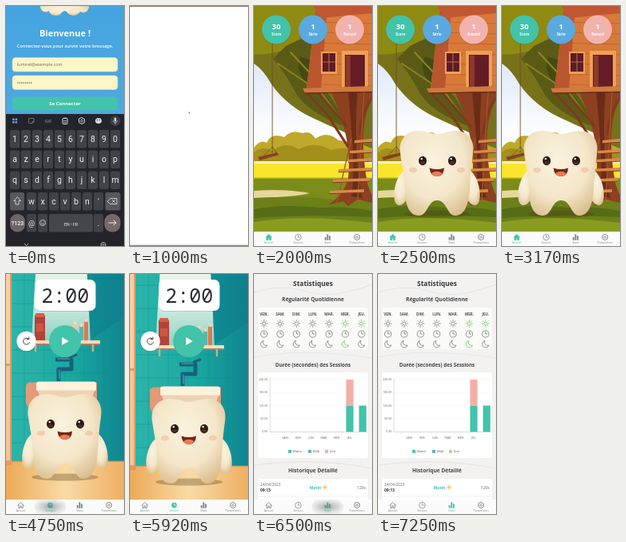
These frames come from a looping animation (148 px wide and 300 px high, 8 s). An HTML page:

```html
<!DOCTYPE html>
<html lang="fr">
<head>
<meta charset="utf-8">
<title>Brossage</title>
<style>
html, body { margin: 0; width: 100%; height: 100%; overflow: hidden; background: #fff; }
svg { display: block; width: 100vw; height: 100vh; }
text { font-family: "Open Sans", "Noto Sans", sans-serif; }
.key { font-family: Roboto, sans-serif; }
.mono { font-family: "Noto Sans Mono", "DejaVu Sans Mono", monospace; }
</style>
</head>
<body>
<svg id="stage" viewBox="0 0 148 300" preserveAspectRatio="none"></svg>
<script>
const LOOP = 8000, TEAL = '#43c3a9', BLUE = '#5aa9df', PINK = '#f2b3ae';
const DAYS = ['VEN.', 'SAM.', 'DIM.', 'LUN.', 'MAR.', 'MER.', 'JEU.'];

const rect = (x, y, w, h, fill, r = 0, more = '') =>
  `<rect x="${x}" y="${y}" width="${w}" height="${h}" rx="${r}" fill="${fill}" ${more}/>`;
const circle = (x, y, r, fill, more = '') =>
  `<circle cx="${x}" cy="${y}" r="${r}" fill="${fill}" ${more}/>`;
const oval = (x, y, rx, ry, fill, more = '') =>
  `<ellipse cx="${x}" cy="${y}" rx="${rx}" ry="${ry}" fill="${fill}" ${more}/>`;
const path = (d, fill, more = '') => `<path d="${d}" fill="${fill}" ${more}/>`;
const line = (d, stroke, width = 1) =>
  path(d, 'none', `stroke="${stroke}" stroke-width="${width}" stroke-linecap="round" stroke-linejoin="round"`);
const text = (x, y, s, size, fill, weight = 400, anchor = 'middle', cls = '') =>
  `<text x="${x}" y="${y}" font-size="${size}" fill="${fill}" font-weight="${weight}" text-anchor="${anchor}" class="${cls}">${s}</text>`;
const group = (id, s) => `<g id="${id}">${s}</g>`;
const at = (x, y, s, k = 1) => `<g transform="translate(${x} ${y}) scale(${k})">${s}</g>`;
const repeat = (n, f) => Array.from({ length: n }, (_, i) => f(i)).join('');

// Icons centred on 0,0
const sun = c => circle(0, 0, 2.1, 'none', `stroke="${c}" stroke-width=".75"`) +
  repeat(8, i => {
    const a = i * Math.PI / 4, x = Math.cos(a), y = Math.sin(a);
    return line(`M${x * 3.3} ${y * 3.3}L${x * 4.6} ${y * 4.6}`, c, .75);
  });
const clock = c => circle(0, 0, 4.1, 'none', `stroke="${c}" stroke-width=".8"`) + line('M0 -2.5V0H2', c, .8);
const moon = c => line('M-1.2 -4A4.3 4.3 0 1 0 4.1 1.6A4.2 4.2 0 0 1 -1.2 -4Z', c, .8);
const gear = c => line('M0 -4L3.5 -2V2L0 4L-3.5 2V-2Z', c, 1) + circle(0, 0, 1.5, 'none', `stroke="${c}" stroke-width=".8"`);
const house = c => line('M-4 0L0 -3.8L4 0M-2.9 -.8V3.8H-.8V1H.8V3.8H2.9V-.8', c, .9);
const bars = c => rect(-3.8, 0, 2, 4, c) + rect(-1, -4, 2, 8, c) + rect(1.8, -1.8, 2, 5.8, c);

const tabX = i => 18.5 + 36.9 * i;

function nav(active) {
  const items = [['Accueil', house], ['Session', clock], ['Stats', bars], ['Paramètres', gear]];
  return rect(0, 282, 148, 18, '#fbfbfb') + items.map(([name, icon], i) => {
    const c = i === active ? TEAL : '#808386';
    const fill = i === active && i < 2 ? (i ? circle(0, 0, 4, c) : path('M-4 0L0 -4L4 0H3V4H1V1H-1V4H-3V0Z', c)) : '';
    return at(tabX(i), 289, fill + icon(fill && i ? '#e9fff8' : c), .93) + text(tabX(i), 297.4, name, 3.6, c);
  }).join('');
}

function tooth() {
  const skin = 'url(#enamel)';
  const eye = x => oval(x, 193.5, 5, 5.8, '#2a1914') + oval(x, 196, 3, 2.2, '#4d2b20') + circle(x - 1.3, 191, 1.2, '#fff');
  return oval(74, 260, 42, 4.5, '#4f3c12', 'opacity=".32"') +
    path('M34 205C24 210 18 230 21 244C24 253 34 249 37 239Z', skin) +
    path('M114 205C124 210 130 230 127 244C124 253 114 249 111 239Z', skin) +
    path('M28 185C25 168 35 156 50 156C62 156 66 160 74 160C82 160 87 156 98 156C113 156 122 168 119 185C117 199 116 211 115 229C114 247 109 262 97 262C86 262 87 243 74 243C62 243 63 262 51 262C38 262 34 246 34 230C33 211 30 199 28 185Z', skin) +
    oval(44, 205, 5, 3.2, '#eda07c', 'opacity=".38"') + oval(104, 205, 5, 3.2, '#eda07c', 'opacity=".38"') +
    eye(56) + eye(93) +
    path('M64.5 202.5Q74 205.5 83 202.5Q82.5 213 74 213Q65.5 213 64.5 202.5Z', '#74261c') +
    path('M67 209Q74 204.5 80.5 209Q78 213 74 213Q69.5 213 67 209Z', '#ee7a52');
}

function keyboard() {
  const c = '#d8d9dc', dark = '#414247';
  const key = (x, y, w, s, fill = dark, size = 10.5) =>
    rect(x - w / 2, y - 11, w, 22.5, fill, 2.5) + text(x, y + 3.5, s, size, '#f0f0f2', 400, 'middle', 'key');
  const row = (s, x, y) => [...s].map((k, i) => key(x + 14 * i, y, 12.2, k)).join('');
  const grid = repeat(4, i => rect(-3 + 3.5 * (i % 2), -3 + 3.5 * (i >> 1), 2.6, 2.6, '#6f9ae3', .5));
  return rect(0, 135, 148, 165, '#232429') +
    at(11, 143.5, grid) +
    at(32, 143.5, line('M-3 -3H3V1L1 3H-3ZM1 3V1H3', '#77797e', .9)) +
    text(53, 146, 'GIF', 5.5, '#777a80', 600, 'middle', 'key') +
    at(74, 143.5, rect(-3, -3, 6, 7, 'none', .8, `stroke="${c}"`) + line('M-1 -3.5H1M-1.4 0H1.4M-1.4 2H1.4', c, .8)) +
    at(95, 143.5, gear(c)) +
    at(116, 143.5, oval(0, 0, 4, 3.6, c) + circle(-1.5, -1, .7, dark) + circle(1.3, -1, .7, dark)) +
    circle(137, 143.5, 6.5, '#3d3e44') + at(137, 143.5, rect(-1.2, -4, 2.4, 5, c, 1.2) + line('M-2.5 0Q-2 2.5 0 2.5Q2 2.5 2.5 0M0 2.5V4', c, .7)) +
    row('1234567890', 11, 166) + row('azertyuiop', 11, 191.5) + row('qsdfghjklm', 11, 217.5) +
    row("wxcvbn'", 32, 244) +
    key(14, 244, 18, '', '#57585d') + line('M14 239L9.8 243.5H12V248H16V243.5H18.2Z', c, .9) +
    key(134, 244, 19, '', '#57585d') + line('M127.5 244L131 240.5H139V247.5H131ZM133.5 242.5L136.5 245.5M136.5 242.5L133.5 245.5', c, .9) +
    rect(5, 260, 19, 22.5, '#6b6668', 9) + text(14.5, 274, '?123', 7, '#fff', 500, 'middle', 'key') +
    key(32, 271, 12.2, '@', dark, 9) + key(46, 271, 12.2, '') +
    circle(46, 271, 3.6, 'none', `stroke="${c}" stroke-width=".8"`) + line('M44.2 272Q46 274 47.8 272M44.7 269.8V270M47.3 269.8V270', c, .8) +
    key(81.5, 271, 55, 'EN • FR', '#45464b', 5.2) + key(116, 271, 12.2, '.') +
    rect(123.5, 260, 20, 22.5, '#77696a', 9) + line('M129 271H138M135 268L138 271L135 274', '#fff', .9) +
    line('M23 297L25.5 299.5L28 297', c, .8) + at(122, 298.5, circle(0, 0, 3, 'none', `stroke="${c}" stroke-width=".7"`) + line('M-3 0H3M0 -3V3', c, .5));
}

function login() {
  return rect(0, 0, 148, 300, 'url(#water)') +
    path('M43 0H104C104 7 98 10 93 7C89 14 79 13 76 7L73 6L70 8C67 14 55 13 54 6C49 10 43 6 43 0Z', 'url(#enamel)') +
    text(74, 38, 'Bienvenue !', 11, '#fff', 700) +
    text(74, 51.5, 'Connectez-vous pour suivre votre brossage.', 5.75, '#fff', 600) +
    rect(8, 64.5, 132, 17.5, '#fdf6c8', 4, 'stroke="#e4d9a0" stroke-width=".6"') +
    text(14, 75, 'lumiret@exemple.com', 5.4, '#6d694f', 400, 'start') +
    rect(8, 87, 132, 17.5, '#fdf6c8', 4, 'stroke="#e4d9a0" stroke-width=".6"') +
    repeat(8, i => circle(15 + 2.4 * i, 96, .75, '#575344')) +
    rect(8, 113.5, 132, 17, TEAL, 4) + text(74, 124, 'Se Connecter', 6, '#fff', 700) +
    group('keys', keyboard());
}

function badge(x, n, label, fill) {
  return circle(x, 30.5, 18.2, '#3d3820', 'opacity=".18"') + circle(x, 29.5, 18, fill) +
    text(x, 29.4, n, 9.6, '#fff', 700) + text(x, 37.3, label, 4.5, '#fff', 700);
}

function home() {
  const step = (x, y, w) => path(`M${x} ${y}L${x + w} ${y - 2}V${y + 2}L${x} ${y + 3.5}Z`, '#d88a48') +
    line(`M${x} ${y + 3.7}L${x + w} ${y + 2.2}`, '#7d3a20', .9);
  const plank = y => line(`M80 ${y}L148 ${y + 2}`, '#b55c2c', .7);
  return rect(0, 0, 148, 282, 'url(#dawn)') +
    // hedge and lawn
    path('M0 177Q8 166 16 171Q21 158 38 164Q47 154 61 159Q71 155 77 166Q92 155 106 168L148 172V198H0Z', '#c0a82a') +
    path('M0 183Q10 174 24 181Q38 168 56 179Q78 168 96 180Q120 174 148 184V195H0Z', '#a38f1c') +
    rect(0, 194, 148, 3, '#f8f3c4') + rect(0, 197, 148, 19, '#f9e62c') + rect(0, 214.5, 148, 2, '#aeb021') +
    rect(0, 216, 148, 66, '#7b8c1b') +
    path('M0 231Q38 228 70 234Q50 239 0 240Z', '#e6d69b') +
    path('M0 240Q60 237 90 241T148 244V282H0Z', '#6b8019') +
    path('M0 254Q35 247 83 252Q118 250 148 256V264Q70 260 0 265Z', '#566c16') +
    path('M0 270Q60 260 148 271V282H0Z', '#8a9c20') +
    // crown
    path('M0 0H148V178Q130 172 114 158Q95 150 76 141Q42 126 22 98Q12 80 0 72Z', '#77721a') +
    path('M0 0H84Q80 28 56 42Q62 58 34 56Q14 62 0 60Z', '#8f8b12') +
    path('M40 50Q66 36 92 34V108Q108 128 112 150Q66 132 52 108Q38 82 24 66Z', '#5a5a16') +
    path('M58 64Q80 66 92 96Q72 102 62 92Q52 78 58 64Z', '#434a13') +
    line('M30 72L84 108L112 146M46 58L78 92', '#8b851c', 2) +
    line('M23 47V183', '#6f4d22', .9) +
    path('M5 189L29 183L31 186L7 193Z', '#8a3e24') + line('M23 176L10 190M23 176L29 184', '#6f4d22', .8) +
    // trunk
    path('M96 106H148V116Q136 140 137 172C138 204 142 226 148 236V246L130 242L118 250L112 244L92 249Q113 236 118 216C122 184 116 150 96 106Z', '#8c4020') +
    path('M118 106H130C126 150 128 206 136 240L122 238C128 206 122 150 118 106Z', '#6a2c18') +
    line('M64 106L92 136L118 176M78 106L116 150M147 116Q134 136 132 160', '#7d3a1e', 3.2) +
    // cabin
    path('M78 0H148V103H66Z', '#d8793a') + path('M78 0H92L84 103H66Z', '#b9552f') +
    repeat(8, i => plank(7 + 13 * i)) +
    path('M74 0H148V9L84 15Z', '#c15732') +
    rect(110, 56, 33, 47, '#efa052') + rect(114, 61, 25, 42, '#641c26') + rect(115, 62, 6, 41, '#8c3a2c') +
    rect(84, 57, 20, 28, '#efa052') + rect(86, 59, 16, 23, '#5c1b28') + line('M94 59V82M86 70H102', '#c46c38', 1) +
    path('M61 103L148 100V107L64 109Z', '#d07a3c') + line('M64 109L148 107.5', '#6a2c18', 1.6) +
    line('M138 108L130 246M122 166L104 245', '#a5552c', 1.3) +
    step(126, 168, 22) + step(120, 181, 28) + step(118, 192, 30) + step(106, 204, 42) + step(99, 217, 46) + step(95, 231, 43) +
    group('homeTooth', tooth()) +
    badge(28, 30, 'Score', TEAL) + badge(74, 1, 'Série', BLUE) + badge(120, 1, 'Record', PINK) + nav(0);
}

function bathroom() {
  const bottle = (x, y, w, h, c) => rect(x, y, w, h, c, 1.5) + rect(x + w * .2, y - 3, w * .6, 4, '#f2d7b6', .5);
  return rect(0, -10, 148, 300, 'url(#wall)') +
    repeat(9, i => line(`M6 ${14 + 29 * i}H148`, '#0f8b8f', .5)) +
    repeat(6, i => line(`M${23 + 25 * i} -10V240`, '#0f8b8f', .35)) +
    path('M38 -10H101L106 89H32Z', 'url(#mirror)') +
    path('M101 -10H148V60L106 89Z', '#0d7d8a', 'opacity=".55"') +
    rect(0, 240, 148, 52, 'url(#floor)') + line('M0 240H148', '#cf8646', 1.2) +
    rect(0, -10, 7, 255, '#e09a66') + rect(0, -10, 5, 128, '#f6cfa4') + rect(0, 121, 5, 118, '#f3c596') +
    rect(36, 57, 13, 33, '#b1433a', 1.5) + rect(37, 55, 11, 5, '#d85d48', 1) + rect(38, 68, 9, 10, '#cf5642') +
    bottle(83, 68, 7, 21, '#e9cda7') + bottle(92, 71, 5, 18, '#57b7af') + bottle(98, 65, 5, 24, '#df7950') +
    rect(30, 89, 88, 5, '#f6dcb6') + rect(30, 93, 88, 2, '#a97d66') + line('M37 95V102M109 95V102', '#d1aa85', 2.5) +
    path('M66 140V125H82V113H62', 'none', 'stroke="#17627a" stroke-width="5" stroke-linejoin="round"') +
    line('M65 112H80M67 126V137', '#5ba3ae', 1.2) + line('M80 110L88 107', '#17627a', 3) +
    path('M25 147Q25 141.5 31 141.5H114V168L107 185H33L25 167Z', '#e39a78') +
    rect(38, 140.5, 75, 12, '#fff2dc', 3) + path('M40 151.5H111L106 168H45Z', '#ecd3b2') +
    tooth();
}

function session() {
  return group('bathroom', bathroom()) +
    rect(36, 8, 77, 39, '#275f68', 7, 'opacity=".2"') + rect(36, 7, 76.5, 39, '#fff', 7) +
    text(74.2, 35.5, '2:00', 25, '#2a2d30', 500, 'middle', 'mono') +
    circle(25.5, 85, 12.5, '#205d65', 'opacity=".2"') + circle(25.5, 84, 12.2, '#fff') +
    line('M28.5 81.3A4 4 0 1 0 29.4 85.6M28.8 79V81.6H26.2', '#444', 1) +
    circle(74, 84, 20, TEAL) + path('M70.2 79V89L78.6 84Z', '#fff') + nav(1);
}

function stats() {
  const x = i => 12.5 + 20.4 * i, grey = '#777b7d', green = '#66c55b';
  const legend = (px, s, c) => rect(px, 219.7, 4, 4, c, .6) + text(px + 6, 223.4, s, 4.1, '#555', 400, 'start');
  return rect(0, 0, 148, 300, '#f3f2f0') +
    line('M0 23Q35 12 66 22T148 13M0 104Q63 92 148 105M0 239Q80 229 148 243', '#e8e6e3', 1.2) +
    text(74, 14.5, 'Statistiques', 8.4, '#34383a', 700) +
    text(74, 33.5, 'Régularité Quotidienne', 6.7, '#414548', 700) +
    rect(5, 42, 138, 52, '#fbfbfa', 3) +
    DAYS.map((d, i) => text(x(i), 51.5, d, 4.6, '#4b5052', 700) +
      at(x(i), 62, sun(i > 4 ? green : grey)) + at(x(i), 75, clock(grey)) +
      at(x(i), 87.5, moon(i === 5 ? green : grey))).join('') +
    text(74, 115.5, 'Durée (secondes) des Sessions', 6.3, '#414548', 700) +
    rect(5, 123, 138, 107, '#fff', 3) +
    repeat(5, i => {
      const y = 131.5 + 16.4 * i;
      return line(`M20 ${y}H142`, '#eeeeee', .35) + text(17, y + 1.2, (240 - 60 * i).toFixed(2), 3.5, '#666', 400, 'end');
    }) +
    line('M20 131V197.5H142', '#b8b8b8', .5) +
    rect(115.5, 164.5, 9.2, 32.8, TEAL) + rect(115.5, 132, 9.2, 32.5, '#f4afa4') + rect(131.7, 164.5, 9.2, 32.8, TEAL) +
    DAYS.map((d, i) => i < 1 ? '' : text(39.5 + 16.1 * (i - 1), 206, d, 3.6, '#666')).join('') +
    legend(43, 'Matin', TEAL) + legend(68, 'Midi', BLUE) + legend(89, 'Soir', '#f4afa4') +
    text(74, 248, 'Historique Détaillé', 6.6, '#414548', 700) +
    rect(5, 256, 138, 27, '#fff', 3) + line('M5 278H143', '#dedede', .5) +
    text(8, 264.5, '24/04/2023', 4.8, '#666', 400, 'start') + text(8, 271.5, '09:13', 5, '#333', 700, 'start') +
    text(77, 268.5, 'Matin', 5, TEAL, 700) + at(89, 266.7, sun('#f5ad2e') + circle(0, 0, 1.8, '#f9c443'), .7) +
    text(140, 268.5, '120s', 5, '#666', 400, 'end') + nav(2);
}

const gradient = (id, stops, vertical = true) =>
  `<linearGradient id="${id}" ${vertical ? 'x2="0" y2="1"' : ''}>` +
  stops.map(([o, c]) => `<stop offset="${o}" stop-color="${c}"/>`).join('') + '</linearGradient>';

const stage = document.getElementById('stage');
stage.innerHTML = `<defs>
  <radialGradient id="enamel" cx=".45" cy=".36" r=".72"><stop stop-color="#fbf3df"/><stop offset=".6" stop-color="#f4e6c9"/><stop offset="1" stop-color="#d9bb8b"/></radialGradient>
  <radialGradient id="touch"><stop stop-color="#6c7777" stop-opacity=".62"/><stop offset="1" stop-color="#8c9090" stop-opacity=".12"/></radialGradient>` +
  gradient('water', [[0, '#45a4df'], [1, '#5aaee0']]) +
  gradient('dawn', [[.25, '#dfe9fa'], [.55, '#fdfdff']]) +
  gradient('wall', [[0, '#2fb5ab'], [.55, '#1aa9a0'], [1, '#0f8591']], false) +
  gradient('mirror', [[0, '#f1f7ea'], [.5, '#d3ece0'], [1, '#8fd2c6']]) +
  gradient('floor', [[0, '#eda956'], [.5, '#f9dba6'], [1, '#efae62']], false) + '</defs>' +
  group('login', login()) +
  group('blank', rect(0, 0, 148, 300, '#fff') + rect(0, 0, 148, 1, '#8e776b') + rect(0, 298.7, 148, 1.3, '#8a8a8a') + rect(73.7, 132.5, 1.3, 1.3, '#4b4b50')) +
  group('home', home()) + group('session', session()) + group('stats', stats()) +
  group('ripple', rect(-20, 282, 40, 18, 'url(#touch)', 9));

const $ = id => document.getElementById(id);
const ease = (t, a, b) => { const p = Math.max(0, Math.min(1, (t - a) / (b - a))); return p * p * (3 - 2 * p); };
const move = (id, x, y) => $(id).setAttribute('transform', `translate(${x} ${y})`);
const toSession = 4600, toStats = 6330;
const scenes = [['login', 0], ['blank', 620], ['home', 1500], ['session', toSession], ['stats', toStats]];

function draw(t) {
  scenes.forEach(([id, start], i) => {
    const end = i + 1 < scenes.length ? scenes[i + 1][1] : LOOP;
    $(id).style.display = t >= start && t < end ? '' : 'none';
  });
  move('keys', 0, 165 * ease(t, 180, 430));
  $('homeTooth').style.display = t < 2500 ? 'none' : '';
  move('bathroom', 0, -6 * (1 - ease(t, 4750, 5200)));

  // touch feedback on the tab just pressed
  const tap = t < toStats ? toSession : toStats;
  move('ripple', tabX(tap === toSession ? 1 : 2), 0);
  $('ripple').setAttribute('opacity', t < tap ? 0 : 1 - ease(t, tap + 170, tap + 480));
}

const begin = performance.now();
function tick() {
  draw((performance.now() - begin) % LOOP);
  requestAnimationFrame(tick);
}
draw(0);
requestAnimationFrame(tick);
</script>
</body>
</html>
```
